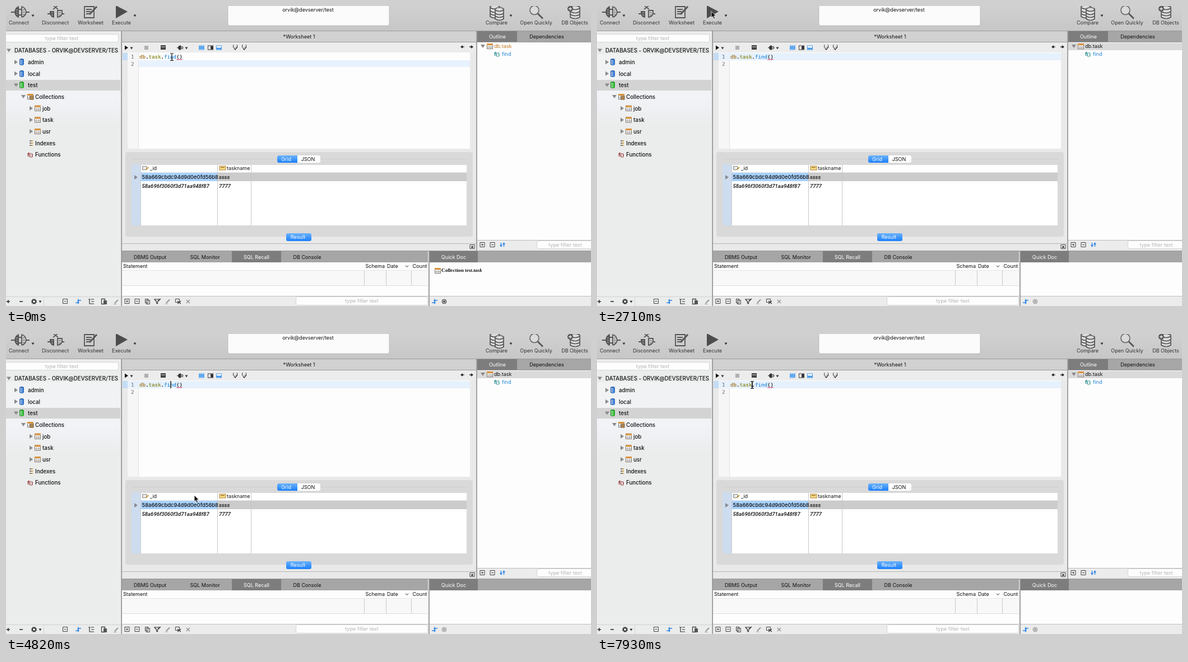
Animation, 1044 px wide and 536 px high, one loop 8000 ms. Source, as an HTML page:

```html
<!DOCTYPE html>
<html lang="en">
<head>
<meta charset="utf-8">
<title>Database worksheet</title>
<style>
html, body { margin: 0; width: 100%; height: 100%; overflow: hidden; background: #ececec; }
svg { display: block; width: 1044px; height: 536px; }
text { font: 9.05px Inter, "Open Sans", sans-serif; font-feature-settings: "calt" 0; fill: currentColor; white-space: pre; }
tspan { fill: currentColor; }
.tree { font-size: 9.75px; font-weight: 500; }
.code, .code tspan { stroke: currentColor; stroke-width: .2px; }
.code { font: 9.13px "DejaVu Sans Mono", monospace; }
.doc { font: bold 9.2px "Liberation Serif", serif; }
.cell { font-size: 9.4px; font-weight: 500; }
.it { font-style: italic; }
.cell.it { font: italic 500 9.6px Roboto, sans-serif; }
.func { font: bold 9.3px "Noto Sans", sans-serif; }
.tiny { font-size: 6.5px; font-weight: 700; }
</style>
</head>
<body>
<svg id="stage" viewBox="0 0 1044 536">
  <defs>
    <linearGradient id="bar" x2="0" y2="1"><stop stop-color="#d0d0d0"/><stop offset="1" stop-color="#c7c7c7"/></linearGradient>
    <linearGradient id="blue" x2="0" y2="1"><stop stop-color="#6cb3fa"/><stop offset="1" stop-color="#1a7ffb"/></linearGradient>
    <linearGradient id="sheen" x2="0" y2="1"><stop stop-color="#f1f2f2"/><stop offset=".6" stop-color="#f1f3f7"/><stop offset="1" stop-color="#ebecec"/></linearGradient>
  </defs>
</svg>
<script>
const stage = document.getElementById('stage');
const DARK = '#555', LINE = '#9b9b9b', PANEL = '#ececec', HEAD = '#d1d1d1', TABS = '#a6a6a6', TAB = '#7d7d7d';

const rect = (x, y, w, h, fill, extra = '') =>
  `<rect x="${x}" y="${y}" width="${w}" height="${h}" fill="${fill}" ${extra}/>`;
const fillPath = (d, fill = DARK) => `<path d="${d}" fill="${fill}"/>`;
const stroke = (d, color = DARK, width = 1) =>
  `<path d="${d}" fill="none" stroke="${color}" stroke-width="${width}"/>`;
const text = (x, y, str, { cls = '', fill = '#111', mid = false } = {}) =>
  `<text x="${x}" y="${y}" class="${cls}" style="color:${fill}" ${mid ? 'text-anchor="middle"' : ''}>${str}</text>`;
const span = (str, color) => `<tspan style="color:${color}">${str}</tspan>`;
const label = (x, y, str, fill) => text(x, y, str, { mid: true, fill });
const at = (x, y, art) => `<g transform="translate(${x} ${y})">${art}</g>`;
const layer = (id, ...art) => `<g id="${id}">${art.join('')}</g>`;

const right = (x, y, c = '#8a8a8a') => fillPath(`M${x} ${y - 4}l6 4l-6 4z`, c);
const down = (x, y, c = '#8a8a8a') => fillPath(`M${x} ${y - 3}h8l-4 6z`, c);
const drop = (x, y, c = '#333') => fillPath(`M${x - 2.5} ${y - 1.5}h5l-2.5 4z`, c);
const searchBox = (x, y, w, h, cx) =>
  rect(x + .5, y + .5, w - 1, h - 1, '#fdfdfd', 'rx="3" stroke="#d4d4d4"') + label(cx, y + 11, 'type filter text', '#b4b4b4');

const tableIcon = (x, y) => at(x, y,
  rect(.5, .5, 10, 9, '#fff', 'stroke="#77706a"') + rect(0, 0, 11, 3, '#d9913a') +
  stroke('M0 6.5h11M4 3v7M7.5 3v7', '#8d8780', .8));
const cylinder = (x, y, c, edge) => at(x, y,
  fillPath('M0 2C0-.6 8-.6 8 2V10C8 12.6 0 12.6 0 10z', edge) +
  rect(1.5, 2, 2, 8.5, '#fff', 'opacity=".65"') + rect(4, 2, 2.5, 9, c));
const signBox = (x, y, plus) =>
  stroke(`M${x - 4} ${y - 4}h8v8h-8zM${x - 2} ${y}h4${plus ? `M${x} ${y - 2}v4` : ''}`, '#444');
const syncIcon = (x, y) =>
  stroke(`M${x - 5} ${y + 2}h5M${x} ${y - 2}h5`, '#2f86e4', 1.4) +
  fillPath(`M${x - 1} ${y - 1}l3 3l-3 3zM${x + 1} ${y - 5}l-3 3l3 3z`, '#2f86e4');
const pencil = (x, y, c) => stroke(`M${x - 3} ${y + 3}l6-6`, c, 2.2) + stroke(`M${x - 5} ${y + 4.5}h5`, c);
const smallPlug = (x, y, c) =>
  stroke(`M${x - 6} ${y}h12M${x + 1} ${y - 2}h4M${x + 1} ${y + 2}h4`, c) +
  fillPath(`M${x + 1} ${y - 4}v8h-2q-3-1-3-4t3-4z`, c);
const splitIcon = (x, y, part, c) =>
  rect(x - 4.5, y - 3.5, 9, 7, '#fff', `stroke="${c}"`) + fillPath(`M${x} ${y}${part}`, c);

function toolbar() {
  const plug = fillPath('M9-1v21q-7-2-8-10q1-9 8-11z') + stroke('M14 0v19M14 0q7 2 8 10q-1 7-8 9', DARK, 1.8) +
    stroke('M-5 10h6M22 10h6M9 5h5M9 15h5', DARK, 1.8) + stroke('M4 6h3M4 10h3M4 14h3', '#c8c8c8', 1.2) +
    stroke('M16 6h3M16 10h4M16 14h3', DARK, 1.2);
  const cut = fillPath('M1 9h8v12q-7-1-8-8z') + stroke('M15 8v12q7-1 8-7v-5z', DARK, 1.8) +
    stroke('M-3 14h5M23 14h4', DARK, 1.8) + stroke('M7-1l9 7M16-1l-9 7', DARK, 1.6) +
    stroke('M4 12h3M4 16h3', '#c8c8c8', 1.2) + stroke('M17 12h4M17 16h3', DARK, 1.2);
  const drum = w => `<path d="M0 1q${w / 2}-5 ${w} 0v18q-${w / 2} 5-${w} 0z" fill="#dcdcdc" stroke="${DARK}" stroke-width="1.7"/>` +
    stroke(`M0 3q${w / 2} 5 ${w} 0M0 9q${w / 2} 5 ${w} 0M0 14q${w / 2} 5 ${w} 0`, DARK, 1.7);
  return [
    rect(0, 0, 1044, 44, 'url(#bar)'), rect(0, 44, 1044, 1, LINE),
    rect(396, -6, 288, 41, '#fbfbfb', 'rx="3" stroke="#b8b8b8" stroke-width=".8"'),
    label(539, 10, 'orvik@devserver/test'),
    at(14, 1, plug), drop(48, 17), at(77, 0, cut),
    stroke('M140 1h17v20h-17zM143 6h10M143 10h8M143 14h6', DARK, 1.8), stroke('M149 15L162 1', DARK, 3),
    at(864, 0, drum(17)), at(873, 4, drum(15)), drop(901, 17),
    '<circle cx="943" cy="7.500" r="8" fill="#dadada" stroke="#666" stroke-width="1.6"/>', stroke('M949 13.500l9 9', DARK, 2.6),
    at(1007, 1, drum(17)), '<circle cx="1007" cy="5" r="5" fill="#555"/>', stroke('M1004 5h6M1007 2v6', '#eee', 1.3),
    ...[[23, 'Connect'], [88, 'Disconnect'], [151, 'Worksheet'], [875.5, 'Compare'], [946, 'Open Quickly'], [1015, 'DB Objects']]
      .map(([x, s]) => label(x, 33, s, '#333')),
    layer('idleTools', fillPath('M196-1L217 10L196 22z', '#4c4c4c'), drop(230, 17), label(206, 33, 'Execute', '#333')),
    layer('busyTools', rect(197, 4, 14, 14, '#4c4c4c'), drop(225, 17), label(203.5, 33, 'Cancel', '#333'))
  ].join('');
}

function sidebar() {
  const row = (x, i, str) => text(x, 83.3 + i * 20.65, str, { cls: 'tree' });
  const mid = i => 79.5 + i * 20.65;
  const art = [
    rect(0, 45, 205, 491, '#ebecec'), rect(0, 86, 204, 130, 'url(#sheen)'), searchBox(-2, 50, 203, 15, 99.5),
    rect(0, 132, 204, 19, '#d3d3d3'),
    down(1, mid(0)), row(15, 0, 'DATABASES - ORVIK@DEVSERVER/TES'),
    right(15, mid(1)), cylinder(24, 94, '#4d94e6', '#2d65b4'), row(39, 1, 'admin'),
    right(15, mid(2)), cylinder(24, 115, '#4d94e6', '#2d65b4'), row(39, 2, 'local'),
    down(14, mid(3)), cylinder(24, 135, '#46d046', '#219a26'), row(39, 3, 'test'),
    down(27, mid(4)), tableIcon(38, 157), rect(43, 161, 6, 6, '#b68642', 'stroke="#6d614e"'), row(52, 4, 'Collections')
  ];
  ['job', 'task', 'usr'].forEach((name, k) =>
    art.push(right(42, mid(k + 5)), tableIcon(51, mid(k + 5) - 5), row(65, k + 5, name)));
  art.push(
    stroke('M42 241h3M42 245h3M42 249h3', '#777', 2), stroke('M45 241h3M45 245h3M45 249h3', '#c9a451', 2), row(52, 8, 'Indexes'),
    text(38, 269, 'f()', { cls: 'func', fill: '#8d2020' }), row(52, 9, 'Functions'),
    rect(0, 519, 205, 1, '#d2d2d2'),
    stroke('M1 528h6M4 525v6M24 528h6', '#222', 1.3),
    '<circle cx="50" cy="528" r="3" fill="none" stroke="#333" stroke-width="2"/><circle cx="50" cy="528" r="4.7" fill="none" stroke="#333" stroke-dasharray="1.8 1.9"/>',
    drop(61, 528), rect(67, 520, 1, 16, '#d6d6d6'), signBox(105.5, 527.5), syncIcon(129, 528),
    stroke('M147 524h4M149 524v8h3M152 528h5M152 532h5M152 524h5', '#333', 1.2),
    stroke('M170.5 523.5h6v9h-6z', '#444', 1.3), rect(174, 526, 6, 7, '#555'), pencil(197, 528, '#999'));
  return art.join('');
}

function editor() {
  const braces = x => text(x, 73.5, '(..)', { cls: 'tiny', fill: '#333', mid: true }) + stroke(`M${x - 2} 75.500l2 2.500l4-5`, '#333', 1.3);
  const code = span('db', '#a3701c') + '.' + span('task', '#85851a') + '.' + span('find', '#2489dd') + '()';
  return [
    rect(205, 45, 635, 392, '#e9e9e9'), rect(207, 45, 632, 19, HEAD), rect(207, 64, 632, 1, LINE),
    label(523, 58, '*Worksheet 1'), rect(207, 65, 632, 18, PANEL),
    layer('idleSmall', right(212, 74.5, '#111'), rect(247, 71, 7, 7, '#b0b0b0'), smallPlug(311, 74.5, '#333')),
    layer('busySmall', right(212, 74.5, '#777'), rect(247, 71, 7, 7, '#444'), smallPlug(311, 74.5, '#bdbdbd')),
    drop(224, 75), rect(276, 70, 9, 8, '#444'), rect(277, 72.5, 7, 1, '#ddd'), drop(322, 75),
    splitIcon(349, 74.5, 'm-4-3h8v6h-8z', '#60a9ee'), splitIcon(365, 74.5, 'v-3h4v6h-4z', '#333'),
    splitIcon(380, 74.5, 'm-4 0h8v3h-8z', '#4798e8'), braces(409), braces(425),
    stroke('M812.5 73h5M827 73h5', '#222', 1.5), fillPath('M815 70v6l-4-3zM830 70v6l4-3z', '#222'),
    rect(217, 83, 611, 172, '#fdfdfd'), rect(217, 83, 19, 172, '#f6f6f6'), rect(236, 83, 1, 172, '#e2e2e2'),
    rect(208, 84, 9, 13, '#c4dcf4'),
    layer('lineTwo', rect(237, 97, 591, 12, '#e8f2fe')), layer('lineOne', rect(217, 84, 611, 13, '#e6f1fd')),
    ...['1', '2'].map((n, i) => text(223, 94 + i * 12.6, n, { cls: 'code', fill: '#808080' })),
    text(238, 93.5, code, { cls: 'code' }),
    stroke('M304 95l1.5 1.5l1.5-1.5l1.5 1.5l1.5-1.5l1.5 1.5l1.5-1.5l1.5 1.5', '#e0245e')
  ].join('');
}

function results() {
  const stripes = [314, 347, 380].map(y => rect(240, y, 582, y === 380 ? 12 : 17, '#f4f4f4'));
  return [
    rect(213, 261, 620, 151, '#d9d9d9', 'rx="4"'), rect(224, 273, 598, 1, '#cecece'),
    rect(484, 267, 77, 13, '#fff', 'rx="3"'), fillPath('M520 267v13h-33q-3 0-3-3v-7q0-3 3-3z', 'url(#blue)'),
    label(500, 277, 'Grid', '#fff'), label(539, 277, 'JSON'),
    rect(224, 283, 16, 109, '#cddcee'), rect(240, 284, 582, 108, '#fff'), rect(240, 297, 582, 1, '#e3e3e3'),
    layer('rows',
      rect(240, 298, 582, 15, '#cbcbcb'), rect(241, 298, 136, 15, '#a8d1fc'),
      rect(240, 284, 1, 108, '#cfcfcf'), rect(377, 284, 1, 108, '#c6c6c6'), rect(437, 284, 1, 108, '#c6c6c6'),
      stroke('M243.500 286.500h7v6h-7zM245 289.500h2', '#777'), stroke('M250 292l4-4', '#c58e2d', 2),
      rect(381, 286, 11, 7, '#f5d789', 'stroke="#b18735"'), stroke('M383 288.500h7', '#8b5a19'),
      text(257, 293, '_id'), text(394, 293, 'taskname'),
      text(242.5, 309, '58a669cbdc94d9d0e0fd56b8', { cls: 'cell' }), text(380, 309, 'ssss', { cls: 'cell it' }),
      text(242.5, 325, '58a696f3060f3d71aa948f87', { cls: 'cell it' }), text(380, 325, '7777', { cls: 'cell it' })),
    layer('blank', ...stripes, rect(244, 286, 1, 106, '#cfcfcf')),
    right(229, 306, '#858b94'),
    rect(500, 406, 45, 14, 'url(#blue)', 'rx="3"'), label(521, 416, 'Result', '#fff'),
    rect(207, 424, 632, 1, '#b5b5b5'), stroke('M828 426.500h8v7h-8z', '#444'), fillPath('M829.500 432l2.500-4l2.500 4z', '#333')
  ].join('');
}

function bottomPanel() {
  return [
    rect(207, 437, 547, 99, PANEL), rect(207, 438, 546, 20, TABS), rect(207, 437, 837, 1, LINE), rect(403, 438, 88, 20, TAB),
    label(257, 452, 'DBMS Output'), label(355, 452, 'SQL Monitor'), label(447, 452, 'SQL Recall', '#fff'), label(537.5, 452, 'DB Console'),
    rect(207, 458, 546, 61, '#fdfdfd'), rect(207, 472, 546, 1, '#e5e5e5'), rect(207, 473, 546, 26, '#f8f8f8'), rect(207, 499, 546, 1, '#dedede'),
    ...[639, 678, 723].map(x => rect(x, 472, 1, 27, '#c8c8c8')),
    text(209, 468, 'Statement'), text(641.5, 468, 'Schema'), text(680, 468, 'Date'), text(725.5, 468, 'Count'),
    stroke('M713 463.500l2.500 3l2.500-3', '#333'), rect(207, 518, 546, 1, '#bdbdbd'),
    signBox(216, 527.5, true), signBox(234, 527.5),
    stroke('M248.500 523.500h5v7h-5zM250.500 525.500h6v7h-6z', '#444'),
    stroke('M265 524h9l-3.500 4v4l-2-1v-3zM272 527l4-4', '#333', 1.2), pencil(289, 527.5, '#999'),
    stroke('M302.500 523.500h7v6h-7z', '#444'), stroke('M306 527l6 5M312 527l-6 5', '#333', 1.3),
    stroke('M322 525l6 6M328 525l-6 6', '#999', 1.7), searchBox(517, 519, 236, 16, 635)
  ].join('');
}

function rightPanels() {
  const name = fill => text(871, 75, 'db.task', { fill });
  return [
    rect(839, 45, 205, 391, '#fdfdfd'), rect(839, 45, 205, 19, TABS), rect(841, 45, 71, 20, TAB), rect(839, 64, 205, 1, LINE),
    label(877, 58, 'Outline', '#fff'), label(965, 58, 'Dependencies'),
    layer('outlinePlain', name('#c4761b')), layer('outlinePicked', rect(841, 66, 203, 13, '#dadada'), name('#111')),
    down(847, 72), tableIcon(858, 67), text(871, 89, 'f()', { cls: 'func', fill: '#167f86' }), text(885, 89, 'find', { fill: '#1c83d6' }),
    rect(839, 418, 205, 18, PANEL), rect(839, 418, 205, 1, '#bbb'), signBox(850, 426.5, true), signBox(868, 426.5),
    stroke('M883.500 423v6M888.500 424v6', '#2f86e4', 1.5), fillPath('M881 427h5l-2.500 4zM886 426h5l-2.500-4z', '#2f86e4'),
    searchBox(947, 419, 105, 15, 998),
    rect(754, 437, 290, 99, PANEL), rect(755, 438, 289, 20, TABS), rect(756, 438, 86, 20, TAB), rect(755, 437, 289, 1, LINE),
    label(799, 452, 'Quick Doc', '#fff'), rect(756, 458, 288, 60, '#fdfdfd'), rect(756, 518, 288, 1, '#bdbdbd'),
    layer('docs', tableIcon(765, 468), text(777, 475, 'Collection <tspan class="it">test.task</tspan>', { cls: 'doc' })),
    syncIcon(765, 528),
    `<g id="target"><circle cx="782" cy="528" r="4" fill="#aaa" stroke="#555"/><circle cx="782" cy="528" r="1.6" fill="#444"/></g>`,
    rect(205, 45, 1, 491, '#b3b3b3'), rect(206, 45, 1, 491, '#909090'), rect(839, 45, 2, 392, '#a2a2a2'), rect(754, 437, 2, 99, '#a2a2a2')
  ].join('');
}

const pointers = layer('caret', rect(-.6, 84, 1.4, 13, '#111')) +
  layer('arrow', '<path d="M0 0V11.500L2.600 9.200L4.500 13.400L6.600 12.500L4.700 8.300H8.300Z" fill="#111" stroke="#fff" stroke-width=".8"/>') +
  layer('beam', stroke('M-3-6.500Q0-6.500 0-4.500Q0-6.500 3-6.500M0-5V5M-3 6.500Q0 6.500 0 4.500Q0 6.500 3 6.500M-1.500 2h3', '#111', 1.1));

stage.insertAdjacentHTML('beforeend',
  toolbar() + sidebar() + editor() + results() + bottomPanel() + rightPanels() + pointers);

const LOOP = 8000;
// Pointer steps: time, x, y, shape.
const pointer = [
  [0, 296, 91, 'beam'], [450, 288, 82, 'arrow'], [600, 264, 60, 'arrow'], [760, 235, 34, 'arrow'],
  [910, 215, 18, 'arrow'], [1070, 210.5, 13, 'arrow'], [1370, 208, 11, 'arrow'], [1670, 204, 9.5, 'arrow'],
  [3760, 204, 14, 'arrow'], [3920, 204, 20, 'arrow'], [4370, 222, 55, 'arrow'], [4520, 272, 145, 'arrow'],
  [4670, 316, 240, 'arrow'], [4820, 336, 288, 'arrow'], [4970, 350, 313, 'arrow'], [5120, 333, 319, 'arrow'],
  [5420, 312, 315, 'arrow'], [5570, 262, 300, 'arrow'], [5720, 200, 278, 'arrow'], [5870, 142, 256, 'arrow'],
  [6010, 98, 238, 'arrow'], [6160, 71, 225, 'arrow'], [6300, 61.5, 220, 'arrow'], [6450, 62, 215, 'arrow'],
  [6600, 85, 203, 'arrow'], [6750, 145, 173, 'arrow'], [6900, 220, 135, 'arrow'], [7050, 295, 108, 'beam'],
  [7200, 324, 96, 'beam'], [7350, 308, 92, 'beam'], [7500, 285, 91, 'beam'], [7640, 277, 91, 'beam']
];
// Caret steps: time, x (0 when hidden).
const caret = [
  [0, 0], [300, 294], [1520, 0], [2110, 294], [2710, 0], [3920, 294], [4370, 0], [4820, 294],
  [5420, 0], [5870, 294], [6450, 0], [6900, 294], [7350, 0], [7640, 277], [7790, 0], [7930, 277]
];

const $ = id => document.getElementById(id);
const show = (on, ...ids) => ids.forEach(id => $(id).style.display = on ? '' : 'none');
const current = (steps, t) => steps.findLast(step => step[0] <= t);

function draw(t) {
  const focused = t >= 300, busy = t >= 2850 && t < 3600, cleared = t >= 3450 && t < 3600;
  show(!focused, 'lineTwo', 'outlinePlain', 'docs');
  show(focused, 'lineOne', 'outlinePicked');
  $('target').style.opacity = focused ? .5 : 1;
  show(!busy, 'idleTools', 'idleSmall');
  show(busy, 'busyTools', 'busySmall');
  show(!cleared, 'rows');
  show(cleared, 'blank');

  const [, x, y, shape] = current(pointer, t);
  show(shape === 'arrow', 'arrow');
  show(shape === 'beam', 'beam');
  $(shape).setAttribute('transform', `translate(${x} ${y})`);
  const caretX = current(caret, t)[1];
  show(caretX, 'caret');
  $('caret').setAttribute('transform', `translate(${caretX} 0)`);
}

const start = performance.now();
function tick() {
  draw((performance.now() - start) % LOOP);
  requestAnimationFrame(tick);
}
tick();
</script>
</body>
</html>
```
